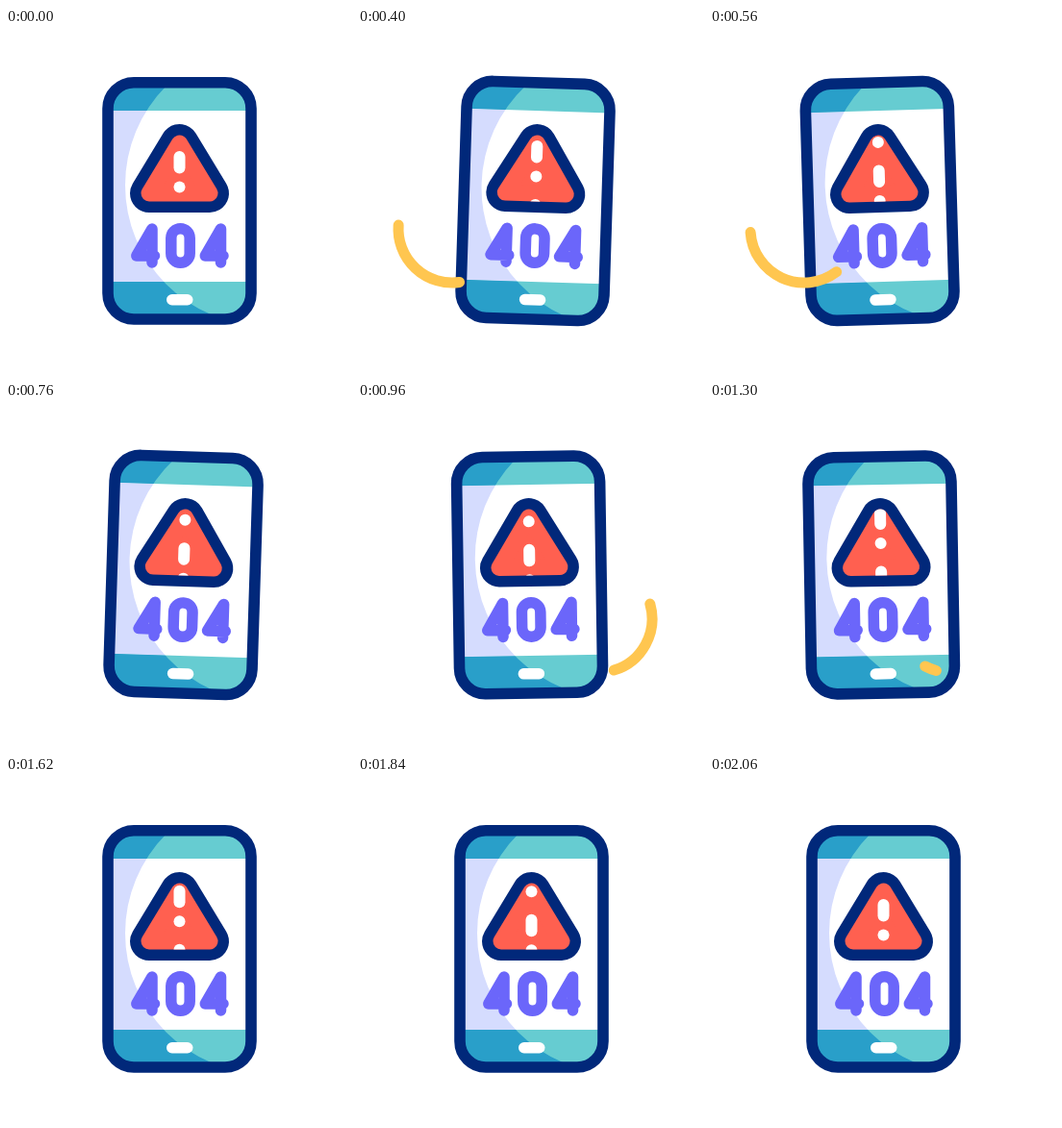
Recreate the animation shown at these times as an HTML page. Size 360 px wide and 360 px high, loop 2.24 s.

```html
<!DOCTYPE html>
<html lang="en">
<head>
<meta charset="utf-8">
<title>404</title>
<style>
  html, body { margin: 0; width: 100%; height: 100%; overflow: hidden; background: #fff; }
  svg { display: block; width: 100%; height: 100%; }
  .round { stroke-linecap: round; stroke-linejoin: round; }
</style>
</head>
<body>
<svg viewBox="0 0 360 360" role="img" aria-label="404 error on a phone">
  <defs>
    <clipPath id="screen"><rect x="106" y="57" width="149" height="246" rx="27"/></clipPath>
    <clipPath id="shade"><path d="M100 50H270V17.5A146 146 0 0 0 270 309.5H100Z"/></clipPath>
    <path id="tri" d="M180.5 120L212 172H149Z"/>
    <mask id="sign" maskUnits="userSpaceOnUse" x="100" y="90" width="160" height="110">
      <use href="#tri" class="round" fill="#fff" stroke="#fff" stroke-width="17"/>
    </mask>
    <g id="bang" class="round" stroke="#fff" stroke-width="12">
      <path d="M180.5 134V145.5"/>
      <path d="M180.5 165.5h.01"/>
    </g>
    <path id="four" d="M152 244V209L135.8 237H154.5"/>
  </defs>

  <g id="phone">
    <g clip-path="url(#screen)">
      <rect x="100" y="50" width="162" height="260" fill="#fff"/>
      <path d="M100 50H262V86H100ZM100 264H262V310H100Z" fill="#66ccd1"/>
      <g clip-path="url(#shade)">
        <rect x="100" y="86" width="162" height="178" fill="#d5dcfe"/>
        <path d="M100 50H262V86H100ZM100 264H262V310H100Z" fill="#299fc9"/>
      </g>
    </g>
    <rect x="106" y="56.8" width="149" height="246.2" rx="27" fill="none" stroke="#01287a" stroke-width="11.6"/>
    <rect x="167" y="277" width="27.5" height="11.5" rx="5.75" fill="#fff"/>

    <use href="#tri" class="round" fill="#01287a" stroke="#01287a" stroke-width="40"/>
    <use href="#tri" class="round" fill="#ff6050" stroke="#ff6050" stroke-width="17"/>
    <g mask="url(#sign)"><g id="strip">
      <use href="#bang" y="-61"/><use href="#bang"/><use href="#bang" y="61"/>
    </g></g>

    <g class="round" fill="none" stroke="#6b66fa" stroke-width="11.5">
      <use href="#four"/>
      <rect x="171.8" y="208.8" width="19.4" height="35.4" rx="9.7"/>
      <use href="#four" x="71.5"/>
    </g>
  </g>

  <g class="round" fill="none" stroke="#ffc650" stroke-width="11">
    <path id="left"/>
    <path id="right"/>
  </g>
</svg>
<script>
const LOOP = 2240, PITCH = 61;
const $ = id => document.getElementById(id);
const phone = $('phone'), strip = $('strip');
const clamp = u => Math.min(1, Math.max(0, u));

// Phone shake: one swing per 160 ms
const SHAKE = [0, 1.9, -1.9, 1.9, -1.9, 1.9, -1.9, 0];
function tilt(t) {
  const p = Math.min(6.9999, Math.max(0, (t - 265) / 160));
  if (t > 1385) return 0;
  const i = Math.floor(p);
  const e = (1 - Math.cos(Math.PI * (p - i))) / 2;
  return SHAKE[i] + (SHAKE[i + 1] - SHAKE[i]) * e;
}

// Sign scroll: time, turns passed
const ROLL = [[260, 0], [400, .18], [560, .76], [960, 2.67], [1300, 4.3], [1620, 5.23], [2060, 6]];
function slope(i) {
  if (i === 0 || i === ROLL.length - 1) return 0;
  const [a, b] = [ROLL[i - 1], ROLL[i + 1]];
  return (b[1] - a[1]) / (b[0] - a[0]);
}
function turns(t) {
  if (t <= 260 || t >= 2060) return 0;
  const i = ROLL.findIndex(k => k[0] > t) - 1;
  const [t0, v0] = ROLL[i], [t1, v1] = ROLL[i + 1];
  const d = t1 - t0, u = (t - t0) / d, u2 = u * u, u3 = u2 * u;
  return (2 * u3 - 3 * u2 + 1) * v0 + (3 * u2 - 2 * u3) * v1
    + d * ((u3 - 2 * u2 + u) * slope(i) + (u3 - u2) * slope(i + 1));
}

// Cords draw on, hold, then trim away from their start
const GROW = 188, TRIM = 295, R = 56;
const CORDS = [
  { el: $('left'), x: 98, y: 209, from: 184, to: 53, start: 255 },
  { el: $('right'), x: 250, y: 225.5, from: -16, to: 118, start: 836 }
];
function drawCord(c, t) {
  const head = clamp((t - c.start) / GROW);
  const tail = clamp((t - c.start - TRIM) / GROW);
  if (head <= tail) return c.el.setAttribute('d', '');
  const at = u => {
    const a = (c.from + (c.to - c.from) * u) * Math.PI / 180;
    return `${c.x + R * Math.cos(a)} ${c.y + R * Math.sin(a)}`;
  };
  c.el.setAttribute('d', `M${at(tail)}A${R} ${R} 0 0 ${c.to > c.from ? 1 : 0} ${at(head)}`);
}

function draw(t) {
  phone.setAttribute('transform', `rotate(${tilt(t)} 180.5 309)`);
  // Wrap into half a pitch either side of rest
  const n = turns(t);
  strip.setAttribute('transform', `translate(0 ${-(n - Math.round(n)) * PITCH})`);
  CORDS.forEach(c => drawCord(c, t));
}

const begin = performance.now();
function tick() {
  draw((performance.now() - begin) % LOOP);
  requestAnimationFrame(tick);
}
tick();
</script>
</body>
</html>
```
